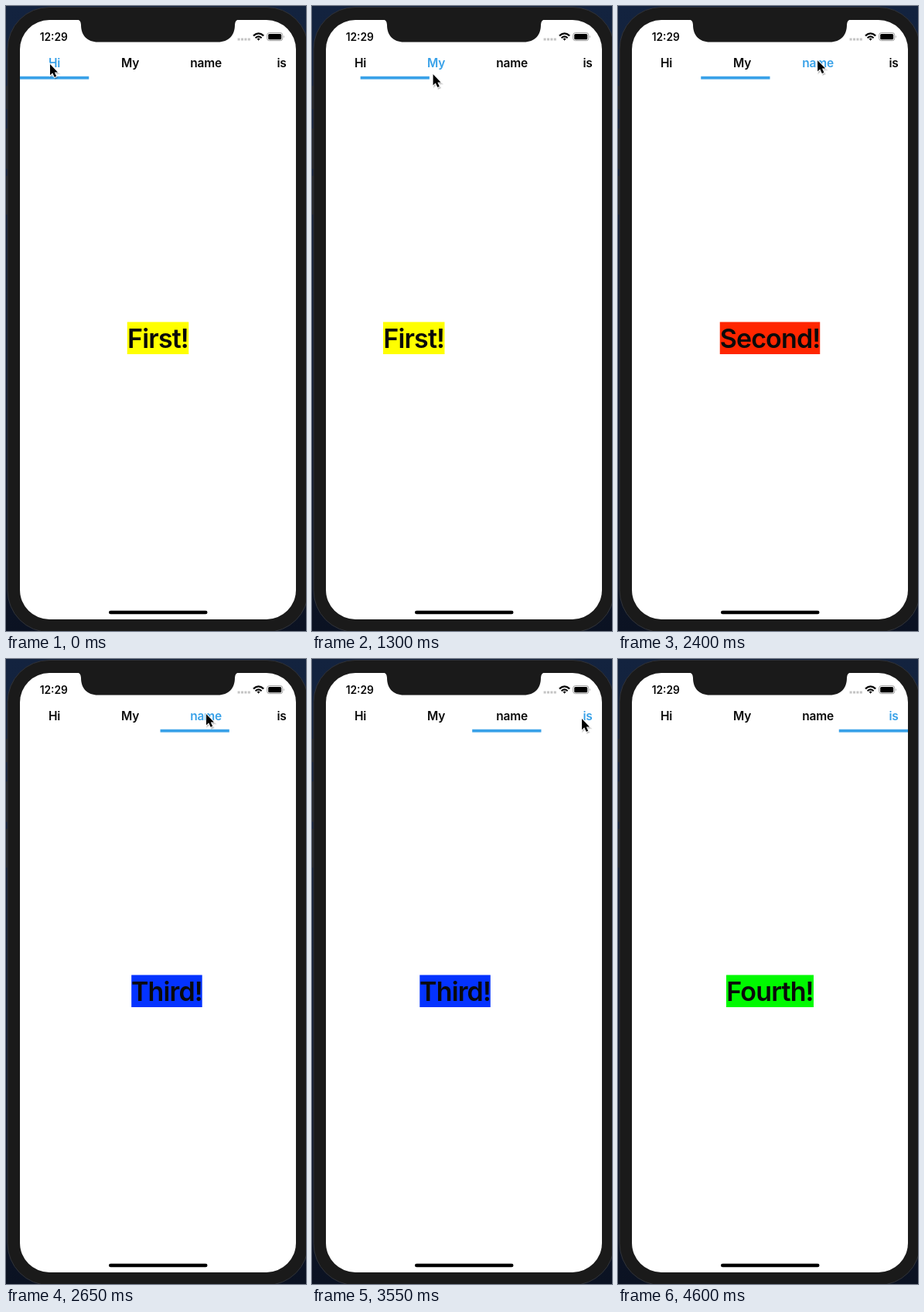
An HTML page that plays this animation: 388 by 806 pixels, repeating every 4700 ms.

```html
<!DOCTYPE html>
<html lang="en">
<head>
<meta charset="utf-8">
<title>Tab pager</title>
<style>
  html, body { margin: 0; width: 100%; height: 100%; overflow: hidden; background: #0c1424; }
  svg { display: block; width: 388px; height: 806px; }
  text { font-family: Inter, "Open Sans", sans-serif; font-weight: 600; fill: #0a0a0a; }
  #tabs text { font-size: 15.5px; letter-spacing: -0.2px; text-anchor: middle; }
  #tabs .active { fill: #38a1e8; }
  #pages text { font-size: 34px; letter-spacing: -0.85px; text-anchor: middle; }
</style>
</head>
<body>
<svg viewBox="0 0 388 806">
  <defs>
    <linearGradient id="desktop" x2="0" y2="1">
      <stop offset="0" stop-color="#13233f"/>
      <stop offset=".6" stop-color="#101c34"/>
      <stop offset="1" stop-color="#0b1222"/>
    </linearGradient>
    <clipPath id="screen"><rect x="18" y="18" width="357" height="773" rx="38"/></clipPath>
  </defs>

  <rect width="388" height="806" fill="url(#desktop)"/>
  <path d="M0 103h3v30h-3zM0 158h3v52h-3zM0 219h3v50h-3z" fill="#24262a"/>
  <rect x="2" y="1.5" width="389" height="806" rx="54" fill="#1a1a1a" stroke="#30333a"/>

  <g clip-path="url(#screen)">
    <rect x="18" y="18" width="357" height="773" fill="#fff"/>
    <g id="pages"></g>
    <g id="tabs"></g>
    <rect id="bar" y="90.7" width="89.25" height="3.8" fill="#38a1e8"/>
    <rect x="133" y="779.7" width="127.5" height="4.6" rx="2.3"/>
  </g>
  <path d="M91 17Q97 18 97 24C97 38 105 46.5 119 46.5H274C288 46.5 296 38 296 24Q296 18 302 17Z" fill="#1a1a1a"/>

  <text x="43.7" y="44.6" font-size="13.8">12:29</text>
  <path d="M299.6 43h3m1.4 0h3m1.4 0h3m1.4 0h3" stroke="#c4c4c4" stroke-width="3"/>
  <g fill="none" stroke="#0a0a0a" stroke-width="2.2">
    <path d="M320 38.4Q326.6 32.4 333.2 38.4M322.6 41.2Q326.6 37.6 330.6 41.2"/>
    <path d="M324.6 42.3Q326.6 40.9 328.6 42.3L326.6 44.7Z" fill="#0a0a0a" stroke="none"/>
  </g>
  <rect x="337.7" y="34.6" width="20" height="10" rx="2.8" fill="none" stroke="#9c9c9c"/>
  <rect x="339.2" y="36" width="17" height="7.2" rx="1.5"/>
  <path d="M359 37.8q1.6 1.8 0 3.6z" fill="#9c9c9c"/>

  <g id="cursor">
    <path d="M0 0V14.2L3.2 11.3L5.7 16.8L8.2 15.7L5.8 10.4H10Z" transform="translate(1.2 1.8)" fill="#0003" stroke="#0002" stroke-width="2"/>
    <path d="M0 0V14.2L3.2 11.3L5.7 16.8L8.2 15.7L5.8 10.4H10Z" stroke="#fff" stroke-width="1.8" paint-order="stroke"/>
  </g>
</svg>

<script>
const LOOP = 4700, STEP = 50;
const LEFT = 18, WIDTH = 357, CENTER = 196.5;
const SLIDE_STARTS = [1200, 2400, 3500], SLIDE_MS = 300;

const tabNames = ["Hi", "My", "name", "is"];
const pageSpecs = [
  ["First!", "#ffff00", 79.5],
  ["Second!", "#ff2600", 129.5],
  ["Third!", "#0433ff", 91.5],
  ["Fourth!", "#00f900", 113],
];

// Rows are [time, ...values].
const barPath = [[0, 0], [50, .12], [100, .5], [150, .9], [200, 1.02], [250, 1.034], [300, 1.02], [400, 1]];
const cursorPath = [
  [0, 57, 75], [450, 57, 75], [700, 92, 83], [950, 142, 79],
  [1100, 156, 76], [1250, 156, 76], [1500, 159, 136], [1750, 182, 142],
  [2050, 238, 96], [2150, 240, 94], [2350, 258, 70], [2650, 259, 71],
  [3100, 349.5, 79.5], [3200, 349.5, 79.5], [3300, 349, 77], [3800, 349, 77],
  [4000, 346, 330], [4200, 342, 815],
];

function sample(path, time) {
  const next = path.findIndex(row => row[0] > time);
  if (next === 0) return path[0].slice(1);
  if (next < 0) return path[path.length - 1].slice(1);
  const a = path[next - 1], b = path[next];
  const k = (time - a[0]) / (b[0] - a[0]);
  return a.slice(1).map((v, i) => v + (b[i + 1] - v) * k);
}

function easeInOut(x) {
  const t = Math.min(1, Math.max(0, x));
  return t < .5 ? .5 * (2 * t) ** 2.5 : 1 - .5 * (2 - 2 * t) ** 2.5;
}

function add(parent, tag, attrs, label = "") {
  const node = document.createElementNS("http://www.w3.org/2000/svg", tag);
  for (const key in attrs) node.setAttribute(key, attrs[key]);
  node.textContent = label;
  return parent.appendChild(node);
}

const byId = id => document.getElementById(id);
const bar = byId("bar"), cursor = byId("cursor");

const tabs = tabNames.map((name, i) =>
  add(byId("tabs"), "text", { x: 62.6 + 98 * i, y: 79.2 }, name));

const pages = pageSpecs.map(([label, color, width]) => {
  const page = add(byId("pages"), "g", {});
  add(page, "rect", { x: CENTER - width / 2, y: 407.5, width, height: 41.5, fill: color });
  add(page, "text", { x: CENTER, y: 440.8 }, label);
  return page;
});

function draw(time) {
  let active = 0, scroll = 0, barIndex = 0;
  for (const start of SLIDE_STARTS) {
    if (time < start) break;
    active++;
    scroll += easeInOut((time - start) / SLIDE_MS);
    barIndex += sample(barPath, time - start)[0];
  }
  tabs.forEach((tab, i) => tab.classList.toggle("active", i === active));
  pages.forEach((page, i) => page.setAttribute("transform", `translate(${(i - scroll) * WIDTH} 0)`));
  bar.setAttribute("x", LEFT + barIndex * WIDTH / 4);
  cursor.setAttribute("transform", `translate(${sample(cursorPath, time).join(" ")})`);
}

const origin = performance.now();
function tick() {
  const elapsed = (performance.now() - origin) % LOOP;
  draw(Math.floor(elapsed / STEP) * STEP);
  requestAnimationFrame(tick);
}
tick();
</script>
</body>
</html>
```
